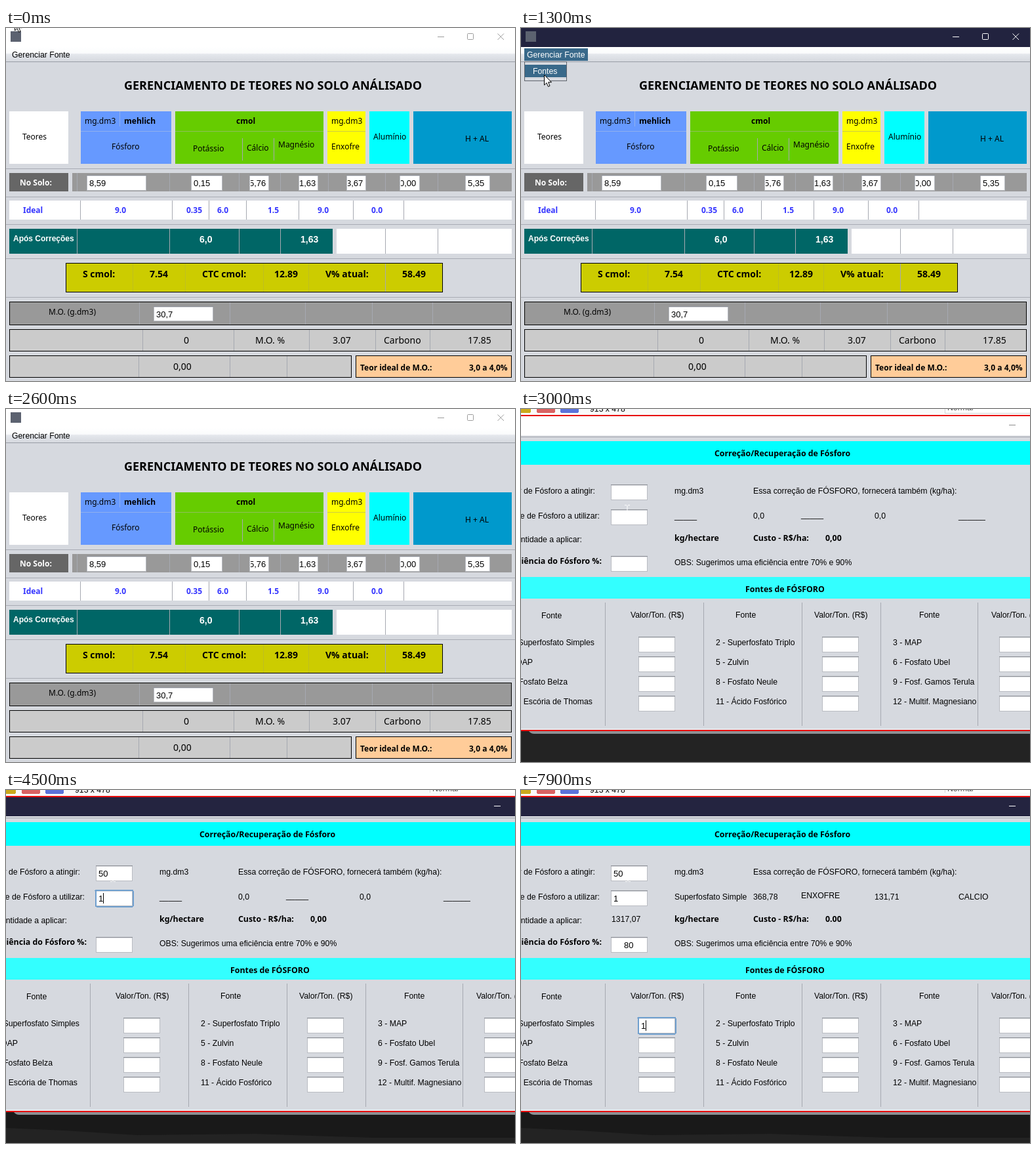
An HTML page for the animation above (8 s loop, 776 px wide and 538 px high).

```html
<!DOCTYPE html>
<html lang="pt">
<head>
<meta charset="utf-8">
<title>Teores no solo</title>
<style>
html, body { margin: 0; width: 100%; height: 100%; overflow: hidden; background: #d6d9df; }
svg { display: block; }
rect, line { shape-rendering: crispEdges; }
text { white-space: pre; font: 12px "Noto Sans", sans-serif; fill: #000; }
.b { font-weight: 700; }
.m { font-size: 14px; }
.h { font-size: 18px; }
.hd { font-weight: 700; font-size: 12.35px; }
.a { font: 12.25px "Liberation Sans", Arial, sans-serif; }
.ab { font: 700 12px "Liberation Sans", Arial, sans-serif; }
.am { font: 700 14px "Liberation Sans", Arial, sans-serif; }
.in { font: 13px "Liberation Sans", Arial, sans-serif; }
.w { fill: #fff; }
.v { fill: #3333ff; }
.t { animation: 8s step-end infinite; }
.active { animation-name: active; }
.menu { animation-name: menu; }
.pick { animation-name: pick; }
.pointer { animation-name: pointer; }
.second { animation-name: second; }
.dim { animation-name: dim; }
.awake { animation-name: awake; }
.beam { animation-name: beam; }
.ring { animation-name: ring; }
.caret { animation-name: caret; }
.five { animation-name: five; }
.fifty { animation-name: fifty; }
.one { animation-name: one; }
.blank { animation-name: blank; }
.found { animation-name: found; }
.full { animation-name: full; }
.rated { animation-name: rated; }
.eighty { animation-name: eighty; }
.price { animation-name: price; }

@keyframes active { 0% { opacity: 0 } 11.25% { opacity: 1 } 25% { opacity: 0 } }
@keyframes menu { 0% { opacity: 0 } 11.25% { opacity: 1 } 18.75% { opacity: 0 } }
@keyframes pick { 0% { opacity: 0 } 15% { opacity: 1 } 18.75% { opacity: 0 } }
@keyframes second { 0% { opacity: 0 } 37.5% { opacity: 1 } }
@keyframes dim { 0% { opacity: 0 } 38.75% { opacity: 1 } }
@keyframes awake { 0% { opacity: 0 } 43.75% { opacity: 1 } }
@keyframes five { 0% { opacity: 0 } 50% { opacity: 1 } 51.25% { opacity: 0 } }
@keyframes fifty { 0% { opacity: 0 } 51.25% { opacity: 1 } }
@keyframes one { 0% { opacity: 0 } 56.25% { opacity: 1 } }
@keyframes blank { 0% { opacity: 1 } 62.5% { opacity: 0 } }
@keyframes found { 0% { opacity: 0 } 62.5% { opacity: 1 } }
@keyframes full { 0% { opacity: 0 } 62.5% { opacity: 1 } 82.5% { opacity: 0 } }
@keyframes rated { 0% { opacity: 0 } 82.5% { opacity: 1 } }
@keyframes eighty { 0% { opacity: 0 } 78.75% { opacity: 1 } }
@keyframes price { 0% { opacity: 0 } 98.75% { opacity: 1 } }
@keyframes beam {
  0% { transform: translate(158px, 146px) }
  41.25% { transform: translate(159px, 123px) }
}
@keyframes pointer {
  0% { transform: translate(13px, -12px); opacity: 1 }
  2.5% { transform: translate(445px, 169px); opacity: 1 }
  3.75% { transform: translate(200px, 100px); opacity: 1 }
  5% { transform: translate(49px, 48px); opacity: 1 }
  7.5% { transform: translate(49px, 42px); opacity: 1 }
  15% { transform: translate(40px, 62px); opacity: 1 }
  16.25% { transform: translate(35px, 71px); opacity: 1 }
  18.75% { transform: translate(50px, 70px); opacity: 1 }
  20% { transform: translate(78px, 68px); opacity: 1 }
  28.75% { transform: translate(88px, 48px); opacity: 1 }
  30% { transform: translate(95px, 28px); opacity: 1 }
  31.25% { transform: translate(99px, 7px); opacity: 1 }
  32.5% { transform: translate(99px, 7px); opacity: 0 }
}
@keyframes ring {
  0% { opacity: 0 }
  43.75% { transform: translate(137px, 115px); opacity: 1 }
  53.75% { transform: translate(137px, 153px); opacity: 1 }
  62.5% { transform: translate(137px, 224px); opacity: 1 }
  82.5% { transform: translate(179px, 347px); opacity: 1 }
}
@keyframes caret {
  0% { opacity: 0 }
  43.75% { transform: translate(141px, 119px); opacity: 1 }
  50% { transform: translate(148px, 119px); opacity: 1 }
  51.25% { transform: translate(155px, 119px); opacity: 1 }
  53.75% { transform: translate(141px, 157px); opacity: 1 }
  56.25% { transform: translate(148px, 157px); opacity: 1 }
  62.5% { transform: translate(164px, 228px); opacity: 1 }
  68.75% { transform: translate(164px, 228px); opacity: 0 }
  73.75% { transform: translate(164px, 228px); opacity: 1 }
  78.75% { transform: translate(171px, 228px); opacity: 1 }
  82.5% { transform: translate(183px, 351px); opacity: 1 }
  88.75% { transform: translate(183px, 351px); opacity: 0 }
  95% { transform: translate(183px, 351px); opacity: 1 }
  98.75% { transform: translate(190px, 351px); opacity: 1 }
}
</style>
</head>
<body>
<svg width="776" height="538" viewBox="0 0 776 538">
  <defs>
    <linearGradient id="bar" x1="0" y1="0" x2="0" y2="1">
      <stop offset="0" stop-color="#fff"/><stop offset=".42" stop-color="#fafbfc"/>
      <stop offset=".5" stop-color="#e4e7ec"/><stop offset="1" stop-color="#d6d9df"/>
    </linearGradient>
    <g id="buttons" fill="none">
      <path d="M658 13.5H668M749.5 8.500L759 18M759 8.500L749.500 18"/>
      <rect x="703.500" y="8.500" width="9" height="9" rx="1" style="shape-rendering:auto"/>
    </g>
  </defs>

  <g>
    <rect width="776" height="538" fill="#d6d9df"/>
    <rect width="776" height="29" fill="#fff"/>
    <use href="#buttons" stroke="#9c9c9c"/>
    <g class="t active">
      <rect width="776" height="29" fill="#22233f"/>
      <use href="#buttons" stroke="#fff"/>
    </g>
    <rect x="7" y="5" width="16" height="16" fill="#5c6270"/>
    <rect y="29" width="776" height="22" fill="url(#bar)"/>
    <rect y="51" width="776" height="1" fill="#989da6"/>
    <text class="a" x="9" y="45">Gerenciar Fonte</text>
    <g id="soil"></g>
    <g class="t menu">
      <rect x="5" y="31" width="97" height="19" fill="#39698a"/>
      <text class="a w" x="9" y="45">Gerenciar Fonte</text>
      <rect x="5.500" y="51.500" width="64" height="29" fill="#d6d9df" stroke="#5f646c"/>
      <text class="a" x="18" y="70">Fontes</text>
    </g>
    <g class="t pick">
      <rect x="6" y="56" width="63" height="19" fill="#39698a"/>
      <text class="a w" x="18" y="70">Fontes</text>
    </g>
    <path class="t pointer" d="M.5.500V16L4 12.600L6.500 18.300L9 17.200L6.600 11.700H11.500Z" fill="#fff" stroke="#000"/>
  </g>

  <g class="t second">
    <rect width="776" height="538" fill="#232323"/>
    <path class="t dim" d="M0 491H776V530H560L380 524L200 526L90 519L0 515Z" fill="#191919"/>
    <path d="M12 491H776V495H20Q15 495 12 491Z" fill="#8e9094"/>
    <rect width="776" height="10" fill="#fafafa"/>
    <rect x="-4" y="-6" width="19" height="12" rx="2" fill="#cbaa1c"/>
    <rect x="24" y="-6" width="28" height="12" rx="3" fill="#d96262"/>
    <rect x="60" y="-6" width="28" height="12" rx="3" fill="#5b72da"/>
    <text class="a" x="105" y="4">913 x 478</text>
    <rect x="646.500" y="-4.500" width="140" height="11" fill="#fff" stroke="#d4d4d4"/>
    <text class="a" x="650" y="2" fill-opacity=".7">Normal</text>
    <rect class="t awake" x="645" y="4" width="131" height="4" fill="#fafafa"/>
    <rect y="11" width="776" height="31" fill="#fff"/>
    <rect x="744" y="24" width="10" height="1" fill="#8d8d8d"/>
    <g class="t awake">
      <rect y="11" width="776" height="31" fill="#242440"/>
      <rect x="744" y="24" width="10" height="1" fill="#fff"/>
    </g>
    <rect y="40" width="776" height="2" fill="#e4e6ea"/>
    <rect y="42" width="776" height="1" fill="#989da6"/>
    <rect y="43" width="776" height="444" fill="#d6d9df"/>
    <rect y="487" width="776" height="2" fill="#e8eaee"/>
    <rect y="9" width="776" height="2" fill="#e80c0c"/>
    <rect y="489" width="776" height="2" fill="#e80c0c"/>
    <rect y="49" width="776" height="36" fill="#00ffff"/>
    <rect y="256" width="776" height="33" fill="#33ffff"/>
    <g id="sources"></g>
    <g class="t blank" id="empty"></g>
    <g class="t found" id="names"></g>
    <g class="t full" id="sum1"></g>
    <g class="t rated" id="sum2"></g>
    <text class="in t five" x="141" y="132">5</text>
    <text class="in t fifty" x="141" y="132">50</text>
    <text class="in t one" x="141" y="170">1</text>
    <text class="in t eighty" x="157" y="241">80</text>
    <text class="in t price" x="183" y="364">1</text>
    <path class="t beam" d="M0 .5H3M5 .5H8M4 1V16M0 16.500H3M5 16.500H8" fill="none" stroke="#fff"/>
    <g class="t ring">
      <rect x="-.5" y="-.5" width="57" height="25" rx="1" fill="none" stroke="#6f9fce" stroke-width="2"/>
    </g>
    <rect class="t caret" width="1" height="16"/>
  </g>
</svg>
<script>
let out;
const into = (id, draw) => {
  out = '';
  draw();
  document.getElementById(id).innerHTML = out;
};
const box = (x, y, r, b, fill) => {
  out += `<rect x="${x}" y="${y}" width="${r - x}" height="${b - y}" fill="${fill}"/>`;
};
const framed = (x, y, r, b, fill) => {
  box(x, y, r, b, '#000');
  box(x + 1, y + 1, r - 1, b - 1, fill);
};
const rules = (y, b, xs, fill = '#a6a9b1') => xs.forEach(x => box(x, y, x + 1, b, fill));
const text = (cls, x, y, str, anchor = 'start') => {
  out += `<text class="${cls}" x="${x}" y="${y}" text-anchor="${anchor}">${str}</text>`;
};
const line = (cls, y, ...parts) => {
  for (let i = 0; i < parts.length; i += 2) text(cls, parts[i], y, parts[i + 1]);
};
// Nimbus text field, its text clipped to the inside
const field = (x, y, w, h, str = '', tx = 0) => {
  box(x, y, x + w, y + h, '#b9bcc2');
  box(x, y, x + w, y + 1, '#8b8e95');
  box(x + 1, y + 1, x + w - 1, y + h - 1, '#fff');
  box(x + 1, y + 1, x + w - 1, y + 2, '#dcdee2');
  if (str) out += `<svg x="${x + 2}" y="${y}" width="${w - 4}" height="${h}">` +
    `<text class="in" x="${tx - x - 2}" y="17">${str}</text></svg>`;
};

into('soil', () => {
  text('b h', 180, 94, 'GERENCIAMENTO DE TEORES NO SOLO ANÁLISADO');
  [214, 257, 299, 351, 410].forEach(y => box(0, y, 776, y + 1, '#a9acb4'));

  box(5, 127, 95, 207, '#fff');
  box(114, 127, 252, 207, '#6699ff');
  box(258, 127, 484, 207, '#66cc00');
  box(490, 127, 548, 207, '#ffff00');
  box(554, 127, 615, 207, '#00ffff');
  box(621, 127, 771, 207, '#0099cc');
  box(114, 157, 252, 158, '#8fb0ee');
  box(258, 157, 484, 158, '#8fc05a');
  box(490, 157, 548, 158, '#cccc44');
  rules(127, 150, [173], '#8fb0ee');
  rules(168, 202, [360, 408]);
  line('', 146, 120, 'mg.dm3', 496, 'mg.dm3');
  line('b', 146, 180, 'mehlich', 351, 'cmol');
  line('', 170, 25, 'Teores', 560, 'Alumínio');
  line('', 185, 161, 'Fósforo', 496, 'Enxofre');
  text('', 285, 188, 'Potássio');
  text('', 367, 187, 'Cálcio');
  text('', 415, 182, 'Magnésio');
  text('', 700, 173, 'H + AL');

  box(5, 221, 95, 249, '#666');
  text('b w', 21, 240, 'No Solo:');
  box(101, 221, 771, 249, '#999');
  rules(221, 249, [108, 249, 355, 418, 491, 578, 658]);
  field(123, 224, 91, 24, '8,59', 127);
  field(282, 224, 48, 24, '0,15', 286);
  field(371, 224, 30, 24, '5,76', 371);
  field(446, 224, 30, 24, '1,63', 447);
  field(519, 224, 30, 24, '3,67', 519);
  field(600, 224, 31, 24, '0,00', 600);
  field(700, 224, 38, 24, '5,35', 704);

  box(5, 263, 771, 292, '#fff');
  rules(263, 292, [113, 253, 309, 366, 446, 529, 606]);
  line('b v', 282, 26, 'Ideal', 166, '9.0', 275, '0.35', 322, '6.0', 399, '1.5', 475, '9.0', 557, '0.0');

  box(5, 306, 498, 344, '#006666');
  box(504, 306, 771, 344, '#fff');
  rules(306, 344, [108, 249, 355, 418, 578, 658]);
  text('ab w', 11, 325, 'Após Correções');
  line('am w', 327, 295, '6,0', 449, '1,63');

  framed(91, 358, 666, 403, '#cccc00');
  rules(359, 402, [193, 273, 392, 461], '#bfbf20');
  rules(359, 402, [578]);
  line('b m', 380, 117, 'S cmol:', 219, '7.54', 299, 'CTC cmol:', 409, '12.89', 487, 'V% atual:', 604, '58.49');

  framed(5, 417, 771, 453, '#999');
  rules(418, 452, [203, 341, 456, 558, 650]);
  text('', 65, 437, 'M.O. (g.dm3)');
  field(225, 424, 91, 23, '30,7', 229);

  framed(5, 459, 771, 493, '#cbcbcb');
  rules(460, 492, [208, 347, 462, 563, 646]);
  line('m', 481, 271, '0', 380, 'M.O. %', 498, '3.07', 576, 'Carbono', 704, '17.85');

  framed(5, 499, 527, 533, '#cbcbcb');
  rules(500, 532, [202, 341, 428]);
  text('m', 255, 521, '0,00');
  framed(533, 499, 771, 533, '#ffcc99');
  line('b', 522, 540, 'Teor ideal de M.O.:', 706, '3,0 a 4,0%');
});

into('sources', () => {
  text('hd', 295, 72, 'Correção/Recuperação de Fósforo');
  text('hd', 342, 279, 'Fontes de FÓSFORO');
  text('a', 113, 129, 'Teor de Fósforo a atingir:', 'end');
  text('a', 120, 167, 'Fonte de Fósforo a utilizar:', 'end');
  text('a', 93, 203, 'Quantidade a aplicar:', 'end');
  text('hd', 123, 236, 'Eficiência do Fósforo %:', 'end');
  line('a', 129, 234, 'mg.dm3', 354, 'Essa correção de FÓSFORO, fornecerá também (kg/ha):');
  line('hd', 201, 234, 'kg/hectare', 354, 'Custo - R$/ha:');
  text('a', 234, 238, 'OBS: Sugerimos uma eficiência entre 70% e 90%');
  [115, 153, 224].forEach(y => field(137, y, 56, 24));

  rules(295, 483, [128, 278, 428, 548, 696]);
  text('a', 31, 319, 'Fonte');
  line('a', 318, 327, 'Fonte', 607, 'Fonte');
  [167, 447, 717].forEach(x => text('a', x, 318, 'Valor/Ton. (R$)'));
  [
    [112, '1 - Superfosfato Simples', '2 - Superfosfato Triplo', '3 - MAP'],
    [18, '4 - DAP', '5 - Zulvin', '6 - Fosfato Ubel'],
    [71, '7 - Fosfato Belza', '8 - Fosfato Neule', '9 - Fosf. Gamos Terula'],
    [109, '10 - Escória de Thomas', '11 - Ácido Fosfórico', '12 - Multif. Magnesiano']
  ].forEach(([end, left, mid, right], i) => {
    const y = 360 + 30 * i;
    text('a', end, y, left, 'end');
    line('a', y, 297, mid, 567, right);
    [179, 459, 729].forEach(x => field(x, y - 13, 56, 24));
  });
});

into('empty', () => {
  line('a', 167, 234, '_____', 354, '0,0', 539, '0,0', 667, '______');
  text('a', 427, 165, '_____');
  text('hd', 464, 201, '0,00');
});
into('names', () => {
  line('a', 167, 234, 'Superfosfato Simple', 667, 'CALCIO');
  text('a', 427, 165, 'ENXOFRE');
  text('hd', 464, 201, '0.00');
});
const sums = (id, first, second, total) => into(id, () => {
  line('a', 167, 354, first, 539, second);
  text('a', 138, 201, total);
});
sums('sum1', '295,02', '105,37', '1053,65');
sums('sum2', '368,78', '131,71', '1317,07');
</script>
</body>
</html>
```
